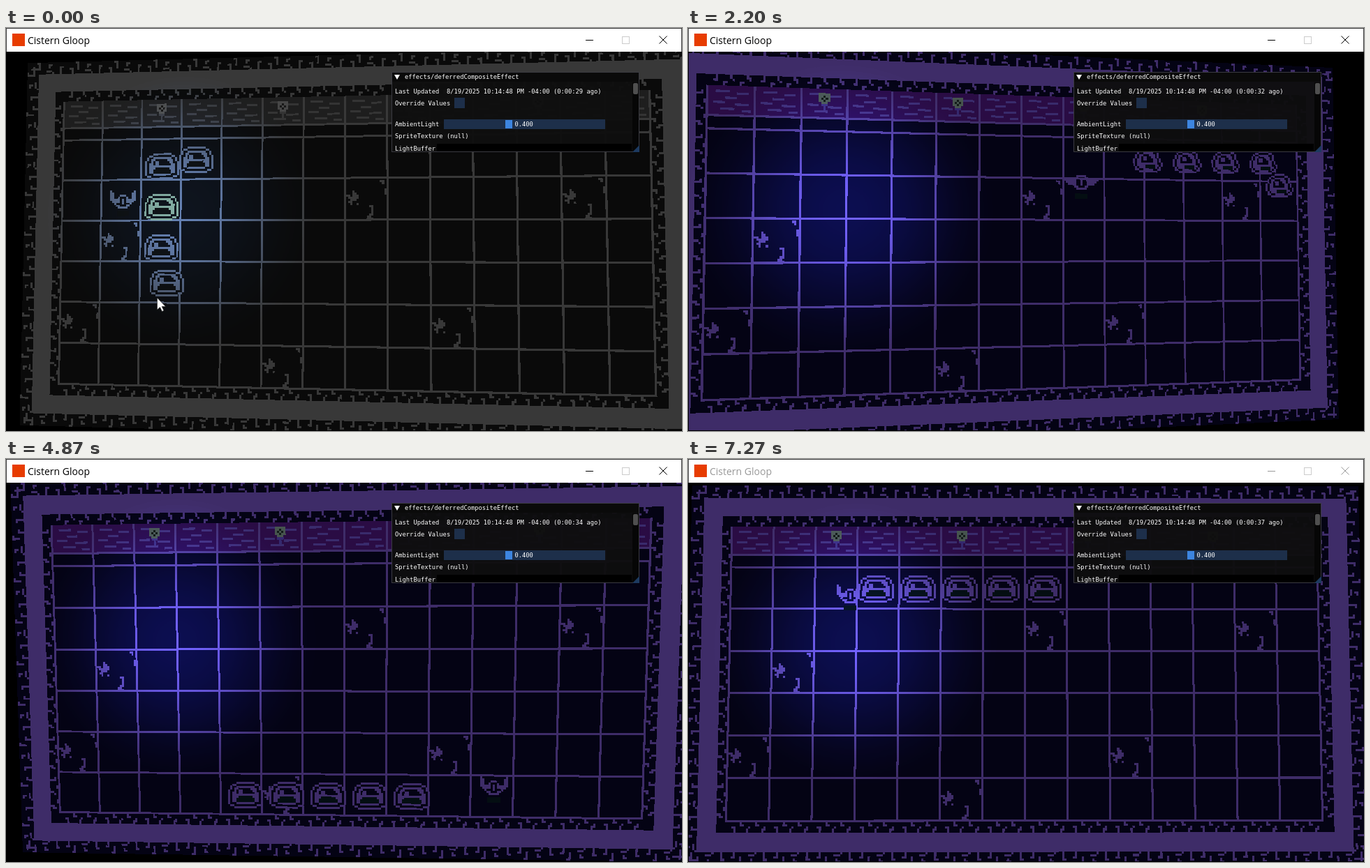
These frames come from a looping animation (968 px wide and 578 px high, 7340 ms). An HTML page with a canvas:

```html
<!DOCTYPE html>
<html lang="en">
<head>
<meta charset="utf-8">
<title>Cistern Gloop</title>
<style>
  html, body { margin: 0; width: 100%; height: 100%; overflow: hidden; background: #000; }
  canvas, svg { position: absolute; display: block; }
  canvas { left: 1px; top: 34px; }
  svg { left: 0; top: 0; }
  .caption { font: 14px "Open Sans", "Noto Sans", sans-serif; }
  .panel text { font: 8.78px "DejaVu Sans Mono", monospace; fill: #fff; white-space: pre; }
  #bar { color: #000; }
  #bar.idle { color: #999; }
</style>
</head>
<body>
<canvas id="view" width="967" height="543"></canvas>
<svg width="968" height="578" viewBox="0 0 968 578">
  <g id="bar">
    <rect width="968" height="34" fill="#3a3a3a"/>
    <rect x="1" y="1" width="966" height="33" fill="#fff"/>
    <rect x="9" y="8" width="18" height="18" fill="#e73c00"/>
    <text class="caption" x="31" y="23" fill="currentColor">Cistern Gloop</text>
    <g fill="none" stroke="currentColor">
      <path d="M830 17.500h11M935.500 11.500l11 11m0-11l-11 11"/>
      <rect x="882.500" y="12.500" width="10" height="10" stroke="#ccc"/>
    </g>
  </g>
  <g class="panel">
    <rect x="552.500" y="63.500" width="354" height="114" fill="#0e0e0e" fill-opacity=".95" stroke="#3b3b42"/>
    <rect x="553" y="64" width="353" height="13" fill="#0a0a0a"/>
    <path d="M556 67h8l-4 7z" fill="#fff"/>
    <text x="571" y="73">effects/deferredCompositeEffect</text>
    <text id="updated" x="557" y="94"></text>
    <text x="557" y="111">Override Values</text>
    <rect x="642" y="100" width="15" height="15" fill="#1d2f4a"/>
    <text x="557" y="141">AmbientLight</text>
    <rect x="627" y="131" width="231" height="14" fill="#1d2f4a"/>
    <rect x="715" y="132" width="10" height="12" fill="#3d85e0"/>
    <text x="728.500" y="141">0.400</text>
    <text x="557" y="158">SpriteTexture (null)</text>
    <rect x="617" y="166" width="279" height="11" fill="#000"/>
    <text x="557" y="176">LightBuffer</text>
    <rect x="897" y="78" width="9" height="99" fill="#060606"/>
    <rect x="898" y="79" width="7" height="16" rx="2" fill="#4f4f4f"/>
    <path d="M907 168v10h-10z" fill="#1d3a60"/>
  </g>
  <path id="cursor" d="M216.500 387v17l4-3.500 3 6 2.500-1.200-2.800-5.800h5.300z" fill="#fff" stroke="#222" stroke-width=".6"/>
</svg>
<script>
const LOOP = 7340, STEP = 66.7;
const TILE = 60.4, ART = 4, W = 1280, H = 720;   // world buffer: 320x180 art pixels, 4x
const [VOID, FLOOR, LINE, BRICK, DASH, TORCH, CORE, SHADE, HANDLE, GREEN] = Array(10).keys();
const LEVELS = 64;

// Each material: unlit and fully lit colour
const night = palette([
  [0x000000, 0x000000], [0x040314, 0x0c0e50], [0x3e2c68, 0x7262ff], [0x2a0c44, 0x34189a],
  [0x392b6c, 0x6452dc], [0x46544e, 0x64788c], [0x141c1a, 0x141c1a], [0x040e12, 0x061628],
  [0x34286e, 0x5a50dc], [0x3e2c68, 0x7262ff]]);
const grey = palette([
  [0x000000, 0x000000], [0x0a0a0a, 0x0e141e], [0x383838, 0x6480b2], [0x1e1e1e, 0x282e3c],
  [0x343434, 0x566688], [0x464646, 0x6e7882], [0x181818, 0x181818], [0x0a0a0a, 0x0f1418],
  [0x343434, 0x566688], [0x506e69, 0x82aca2]]);

const art = {
  outer: ['.....##.............', '......#....##.......', '......#....#.....##.',
          '..##..#..........#..', '...#......###....#..', '...#.........#...#..'],
  inner: ['...#.....#......#...', '...#.....#......##..', '..##......#......#..',
          '......##.....##.....', '......#......#......'],
  crack: ['................##..', '.................#..', '....................', '....................',
          '..................##', '...#..............#.', '...##.............#.', '##.###..............',
          '.#####..............', '..###...............', '.##.................', '..#..#..............',
          '...........##.......', '............#.......', '............#.......', '............#.......',
          '...........##.......', '..........##........', '..........###.......'],
  torch: ['ttttt', 'ttctt', 'tctct', 'ttctt', '.ttt.', '.hhh.', '..h..', '..h..'],
  slime: [
    ['....#########....', '..##.........##..', '.#..#########..#.', '.#.##......###.#.',
     '#..#.##.....##..#', '#.##.##......##.#', '#.#############.#', '#.###ggggggg###.#',
     '#.##ggggggggg##.#', '#.##ggggggggg##.#', '#...#########...#', '.##...........##.',
     '...###########...'],
    ['.....#####.....', '...##.....##...', '..#..#####..#..', '.#.##...###.#..',
     '.#.#.##..##.#..', '#.##.##...##.#.', '#.##......##.#.', '#.##########..#',
     '#.####ggggg##.#', '.#.###ggggg#.#.', '.##..#####..##.', '...#########...']],
  wingsUp: ['#...........#', '##.........##', '##...###...##', '##..#...#..##', '#####.#.#####',
            '.####.#.####.', '..#...#...#..', '...##...##...', '....#####....'],
  wingsFlat: ['......#####......', '.....##...##.....', '######..#..######', '.#####..#..#####.',
              '..####..#..####..', '.....##...##.....', '......#####......'],
  wingsDown: ['....##.##....', '....#####....', '..###...###..', '.###..#..###.', '####..#..####',
              '####..#..####', '##.##...##.##', '##..#####..##', '#....#.#....#']
};
const batFrames = [art.wingsUp, art.wingsFlat, art.wingsDown, art.wingsFlat];
const inks = { '#': LINE, g: SHADE, t: TORCH, c: CORE, h: HANDLE };

function palette(pairs) {
  const out = new Uint32Array(pairs.length * LEVELS);
  pairs.forEach(([dark, lit], m) => {
    for (let i = 0; i < LEVELS; i++) {
      const mix = shift => {
        const from = dark >> shift & 255, to = lit >> shift & 255;
        return Math.round(from + (to - from) * i / (LEVELS - 1));
      };
      out[m * LEVELS + i] = (255 << 24 | mix(0) << 16 | mix(8) << 8 | mix(16)) >>> 0;
    }
  });
  return out;
}

function rect(buf, x, y, w, h, ink) {
  const x0 = Math.round(x * ART), x1 = Math.round((x + w) * ART);
  const y0 = Math.round(y * ART), y1 = Math.round((y + h) * ART);
  for (let row = Math.max(0, y0); row < Math.min(H, y1); row++)
    buf.fill(ink, row * W + Math.max(0, x0), row * W + Math.min(W, x1));
}

function stamp(buf, rows, x, y, ink = LINE, solid = false) {
  rows.forEach((row, j) => {
    const first = row.indexOf('#'), last = row.lastIndexOf('#');
    [...row].forEach((c, i) => {
      if (c !== '.') rect(buf, x + i, y + j, 1, 1, c === '#' ? ink : inks[c]);
      else if (solid && i > first && i < last) rect(buf, x + i, y + j, 1, 1, FLOOR);
    });
  });
}

function centred(buf, rows, u, v, ink, solid) {
  stamp(buf, rows, u * 20 - rows[0].length / 2, v * 20 - rows.length / 2, ink, solid);
}

function buildRoom() {
  const buf = new Uint8Array(W * H).fill(FLOOR);
  const sides = [
    [320, (p, d) => [p, d]], [320, (p, d) => [p, 179 - d]],
    [180, (p, d) => [d, p]], [180, (p, d) => [319 - d, p]]];
  for (const [length, place] of sides)
    for (let p = 0; p < length; p++)
      for (let d = 0; d < 20; d++) {
        const on = d < 6 ? art.outer[d][p % 20] === '#'
          : d < 15 ? p >= 6 && p < length - 6
          : p >= 20 && p < length - 20 && art.inner[d - 15][p % 20] === '#';
        if (on) rect(buf, ...place(p, d), 1, 1, LINE);
      }
  rect(buf, 20, 20, 280, 13.5, BRICK);
  const dashes = [[3, 2, 6], [12, 3, 5], [7, 5, 5], [2, 7, 5], [11, 8, 6], [5, 10, 6], [14, 11, 4]];
  for (let u = 1; u < 15; u++)
    for (const [x, y, w] of dashes) rect(buf, u * 20 + x, 20 + y, w, 1, DASH);
  for (let u = 1; u <= 15; u++) rect(buf, u * 20 - 1, 20, 1, 140, LINE);
  for (let v = 2; v <= 8; v++) rect(buf, 19, v * 20 - 1, 281, 1, LINE);
  rect(buf, 20, 33, 280, 1, LINE);
  for (const [u, v] of [[8, 3], [13, 3], [2, 4], [1, 6], [10, 6], [6, 7]])
    stamp(buf, art.crack, u * 20, v * 20 + .5);
  for (const u of [3, 6, 9, 12]) stamp(buf, art.torch, u * 20 + 7, 22);
  return buf;
}

function buildLight() {
  const out = new Uint8Array(W * H);
  for (let y = 0; y < H; y++)
    for (let x = 0; x < W; x++) {
      const d = Math.hypot(x - 316, y - 302) / 80;
      out[y * W + x] = Math.round((LEVELS - 1) * Math.max(0, 1 - (d / 3.5) ** 2) ** 2);
    }
  return out;
}

const route = [[4.5, 5.5], [3.5, 5.5], [3.5, 2.5], [14.5, 2.5], [14.5, 7.5], [3.5, 7.5], [3.5, 2.5], [14.5, 2.5]];
function along(distance) {
  for (let i = 1; i < route.length; i++) {
    const [x0, y0] = route[i - 1], [x1, y1] = route[i];
    const length = Math.abs(x1 - x0) + Math.abs(y1 - y0);
    if (distance <= length) {
      const k = distance / length;
      return [x0 + (x1 - x0) * k, y0 + (y1 - y0) * k];
    }
    distance -= length;
  }
  return route[route.length - 1];
}

function bounce(x, lo, hi) {
  const span = hi - lo, k = (((x - lo) % (2 * span)) + 2 * span) % (2 * span);
  return lo + (k > span ? 2 * span - k : k);
}

const room = buildRoom(), light = buildLight(), world = new Uint8Array(W * H);
const ctx = document.getElementById('view').getContext('2d');
const image = ctx.createImageData(967, 543);
const pixels = new Uint32Array(image.data.buffer);
const byId = id => document.getElementById(id);

// Tilted plane: screen = world / (1 + a*x + b*y), measured from the centre
function project(a, b, colours) {
  const cx = 8 * TILE - 30000 * a, cy = 4.5 * TILE - 20000 * b, scale = 80 / TILE;
  let i = 0;
  for (let row = 0; row < 543; row++) {
    const y = row + .5 - cy;
    for (let col = 0; col < 967; col++) {
      const x = col + .5 - cx, k = scale / (1 - a * x - b * y);
      const wx = Math.floor(x * k + W / 2), wy = Math.floor(y * k + H / 2);
      const at = wy * W + wx;
      pixels[i++] = wx < 0 || wy < 0 || wx >= W || wy >= H
        ? 0xff000000 : colours[world[at] * LEVELS + light[at]];
    }
  }
  ctx.putImageData(image, 0, 0);
}

function draw(t) {
  const head = 4.85 + Math.max(0, 5.37 + (t - 1130) / 200);
  const pose = Math.floor((t + 100) / 200);
  const flown = Math.max(0, t - 56) / 1000;
  const batU = bounce(2.53 + 3.21 * flown, 1.25, 14.75);
  const batV = bounce(3.46 - 1.92 * flown, 1.2, 7.7);

  world.set(room);
  rect(world, batU * 20 - 3, batV * 20 + 5.5, 6, 2.5, SHADE);
  centred(world, batFrames[pose % 4], batU, batV);
  for (let i = 4; i >= 0; i--)
    centred(world, art.slime[pose % 2], ...along(head - i), i === 2 ? GREEN : LINE, true);

  const [u, v] = along(head - .2);
  project(.25e-4 * (u - 8), .24e-4 * (v - 4.5), t > 0 ? night : grey);

  const age = Math.floor(29.9 + t / 1000);
  byId('updated').textContent = `Last Updated  8/19/2025 10:14:48 PM -04:00 (0:00:${age} ago)`;
  byId('bar').classList.toggle('idle', t > 7100);
  byId('cursor').style.display = t > 0 ? 'none' : '';
}

let shown = -1;
function tick() {
  const frame = Math.min(109, Math.floor((performance.now() % LOOP + 5) / STEP));
  if (frame !== shown) draw(frame * STEP);
  shown = frame;
  requestAnimationFrame(tick);
}
tick();
</script>
</body>
</html>
```
